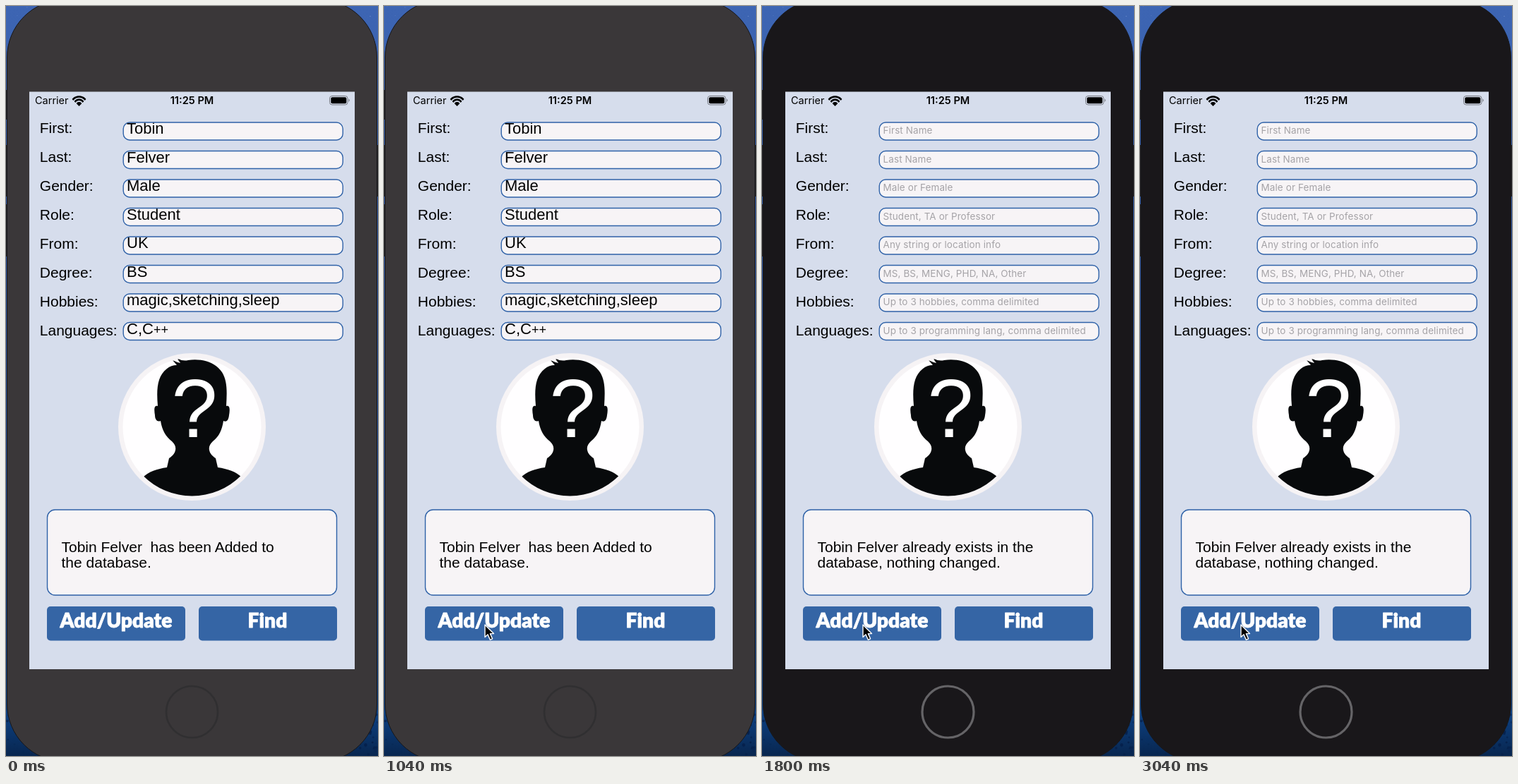
Animation of 527x1063 px, one loop 3080 ms. Source, as an HTML page:

```html
<!DOCTYPE html>
<html lang="en">
<head>
<meta charset="utf-8">
<title>Student form</title>
<style>
  html, body { margin: 0; width: 100%; height: 100%; overflow: hidden; background: #2d56a0; }
  svg { display: block; width: 100%; height: 100%; }
  text { font-family: "Liberation Sans", Arial, sans-serif; white-space: pre; }
  .ui { font-family: Inter, sans-serif; }
  .label { font-size: 21px; }
  .value { font-size: 22px; }
  .hint { font-size: 13.45px; letter-spacing: .13px; fill: #a5a3a7; }
  .message { font-size: 21px; }
  .button {
    font: 900 28.2px Lato, sans-serif; text-anchor: middle;
    fill: #fff; stroke: #fff; stroke-width: .8; stroke-linejoin: round;
  }
  .outlined { fill: #f7f4f6; stroke: #2f62a8; stroke-width: 1.4; }
</style>
</head>
<body>
<svg viewBox="0 0 527 1063">
  <defs>
    <linearGradient id="sky" x2="0" y2="1">
      <stop offset="0" stop-color="#3d65b3"/>
      <stop offset=".6" stop-color="#2a539d"/>
      <stop offset=".94" stop-color="#0d4285"/>
      <stop offset="1" stop-color="#08264f"/>
    </linearGradient>
    <clipPath id="portrait"><circle cx="263.5" cy="596.5" r="98"/></clipPath>
    <clipPath id="wedge"><path d="M103.5 142L88 126.5V120H119V126.5Z"/></clipPath>
  </defs>

  <rect width="527" height="1063" fill="url(#sky)"/>
  <g id="specks"></g>
  <path d="M0 119h4v42h-4zM0 197h4v73h-4zM0 281h4v74h-4zM523 197h4v73h-4z" fill="#222124"/>
  <rect id="body" x="1.5" y="-9" width="524" height="1080" rx="82" stroke="#17171a"/>
  <circle id="home" cx="263.5" cy="1000.5" r="36.5" fill="none"/>
  <rect x="33" y="121.5" width="461" height="818.5" fill="#d6ddec"/>

  <text class="ui" x="41" y="139" font-size="14.5">Carrier</text>
  <g clip-path="url(#wedge)" fill="none" stroke="#000" stroke-width="2.7">
    <circle cx="103.5" cy="140" r="11.5"/>
    <circle cx="103.5" cy="140" r="7.3"/>
    <circle cx="103.5" cy="140" r="2" stroke-width="4"/>
  </g>
  <text class="ui" x="263.5" y="139" font-size="14.6" font-weight="600" text-anchor="middle">11:25 PM</text>
  <rect x="458.5" y="127.5" width="25.5" height="12.5" rx="3.5" fill="none" stroke="#777a82"/>
  <rect x="460.3" y="129.2" width="22" height="9" rx="2"/>
  <path d="M485.5 131.5q2.6 2 0 4.5z" fill="#777a82"/>

  <g id="form"></g>
  <g id="filled"></g>
  <g id="empty"></g>

  <circle cx="263.5" cy="596.5" r="104.5" fill="#f6f3f5"/>
  <g clip-path="url(#portrait)">
    <rect x="160" y="490" width="210" height="210" fill="#fffeff"/>
    <path fill="#080a0c" d="M215 567C213 543 214 525 228 514Q234 509 242 509L236 502
      Q242 505 247 506L242 499Q250 504 258 502C281 499 298 507 306 519C314 532 313 548 312 567
      C318 565 317 574 316 580C315 588 312 590 308 588C306 601 302 610 293 617
      C285 624 286 634 297 641L300 654C314 656 326 660 334 668L340 700H187L194 668
      C202 660 214 656 228 654L231 641C242 634 243 624 235 617C226 610 221 601 219 588
      C214 590 211 586 211 580C210 574 209 565 215 567Z"/>
    <text x="267" y="611" font-size="117" fill="#fff" text-anchor="middle">?</text>
  </g>

  <rect class="outlined" x="58.5" y="714" width="410" height="121" rx="11"/>
  <text class="message" x="78.5" y="774" id="line1"></text>
  <text class="message" x="78.5" y="796" id="line2"></text>
  <g fill="#3565a5">
    <rect x="58" y="851" width="196" height="48.5" rx="5"/>
    <rect x="273" y="851" width="196" height="48.5" rx="5"/>
  </g>
  <text class="button" x="156" y="881">Add/Update</text>
  <text class="button" x="370.5" y="881">Find</text>

  <path id="cursor" d="M0 0V17.500L4 13.800L7.300 21.300L10.600 19.800L7.400 12.600H12.500Z"
    stroke="#fff" stroke-width="1.4" stroke-linejoin="round"/>
</svg>
<script>
const LOOP = 3080, ACTIVATE = 1080, SUBMIT = 1480;
const $ = id => document.getElementById(id);

const first = "Tobin", last = "Felver";
const rows = [
  ["First:", first, "First Name"],
  ["Last:", last, "Last Name"],
  ["Gender:", "Male", "Male or Female"],
  ["Role:", "Student", "Student, TA or Professor"],
  ["From:", "UK", "Any string or location info"],
  ["Degree:", "BS", "MS, BS, MENG, PHD, NA, Other"],
  ["Hobbies:", "magic,sketching,sleep", "Up to 3 hobbies, comma delimited"],
  ["Languages:", 'C,C<tspan font-size="18">++</tspan>', "Up to 3 programming lang, comma delimited"]
];
const messages = {
  added: [`${first} ${last}  has been Added to`, "the database."],
  exists: [`${first} ${last} already exists in the`, "database, nothing changed."]
};

const text = (cls, x, y, content) => `<text class="${cls}" x="${x}" y="${y}">${content}</text>`;
const eachRow = draw => rows.map((row, i) => draw(row, i, 165 + 40.5 * i)).join("");

$("form").innerHTML = eachRow(([label], i, top) =>
  text("label", 47.8, 180.3 + 41 * i, label) +
  `<rect class="outlined" x="166.2" y="${top}" width="311" height="25" rx="9"/>`);
// Values sit high in their fields and are cut off by the top edge.
$("filled").innerHTML = eachRow(([, value], i, top) =>
  `<clipPath id="field${i}"><rect x="167" y="${top + .7}" width="310" height="24"/></clipPath>` +
  `<g clip-path="url(#field${i})">${text("value", 171, top + 16, value)}</g>`);
$("empty").innerHTML = eachRow(([, , hint], i, top) => text("ui hint", 171.5, top + 16.4, hint));

// Faint stars in the upper corners, dark grain in the lower ones
let seed = 7;
const random = () => (seed = seed * 16807 % 2147483647) / 2147483647;
const specks = (count, top, color, size) => Array.from({ length: count }, (_, i) =>
  `<circle cx="${random() * 60 + (i % 2 ? 467 : 0)}" cy="${top + random() * 60}"
    r="${(.3 + random() * .6) * size}" opacity="${random()}" fill="${color}"/>`).join("");
$("specks").innerHTML = specks(36, 0, "#a9c0ea", 1) + specks(90, 1003, "#06204a", 2.5);

// Cursor waypoints: time, x, y
const path = [[280, 112, 1063], [600, 136, 894], [1000, 143, 877], [LOOP, 143, 877]];
function cursorAt(t) {
  const k = path.findIndex(p => t < p[0]);
  if (k < 1) return null;
  const [t0, x0, y0] = path[k - 1], [t1, x1, y1] = path[k];
  const u = 1 - (1 - (t - t0) / (t1 - t0)) ** 2;
  return [x0 + (x1 - x0) * u, y0 + (y1 - y0) * u];
}

function render(t) {
  const active = t >= ACTIVATE, submitted = t >= SUBMIT;
  $("body").setAttribute("fill", active ? "#19171a" : "#3a3739");
  $("home").setAttribute("stroke", active ? "#656467" : "#302f31");
  $("home").setAttribute("stroke-width", active ? 3.2 : 2.6);
  $("filled").style.display = submitted ? "none" : "";
  $("empty").style.display = submitted ? "" : "none";
  [$("line1").textContent, $("line2").textContent] = submitted ? messages.exists : messages.added;
  const at = cursorAt(t);
  $("cursor").style.display = at ? "" : "none";
  if (at) $("cursor").setAttribute("transform", `translate(${at})`);
}

const start = performance.now();
function tick() {
  render((performance.now() - start) % LOOP);
  requestAnimationFrame(tick);
}
tick();
</script>
</body>
</html>
```
